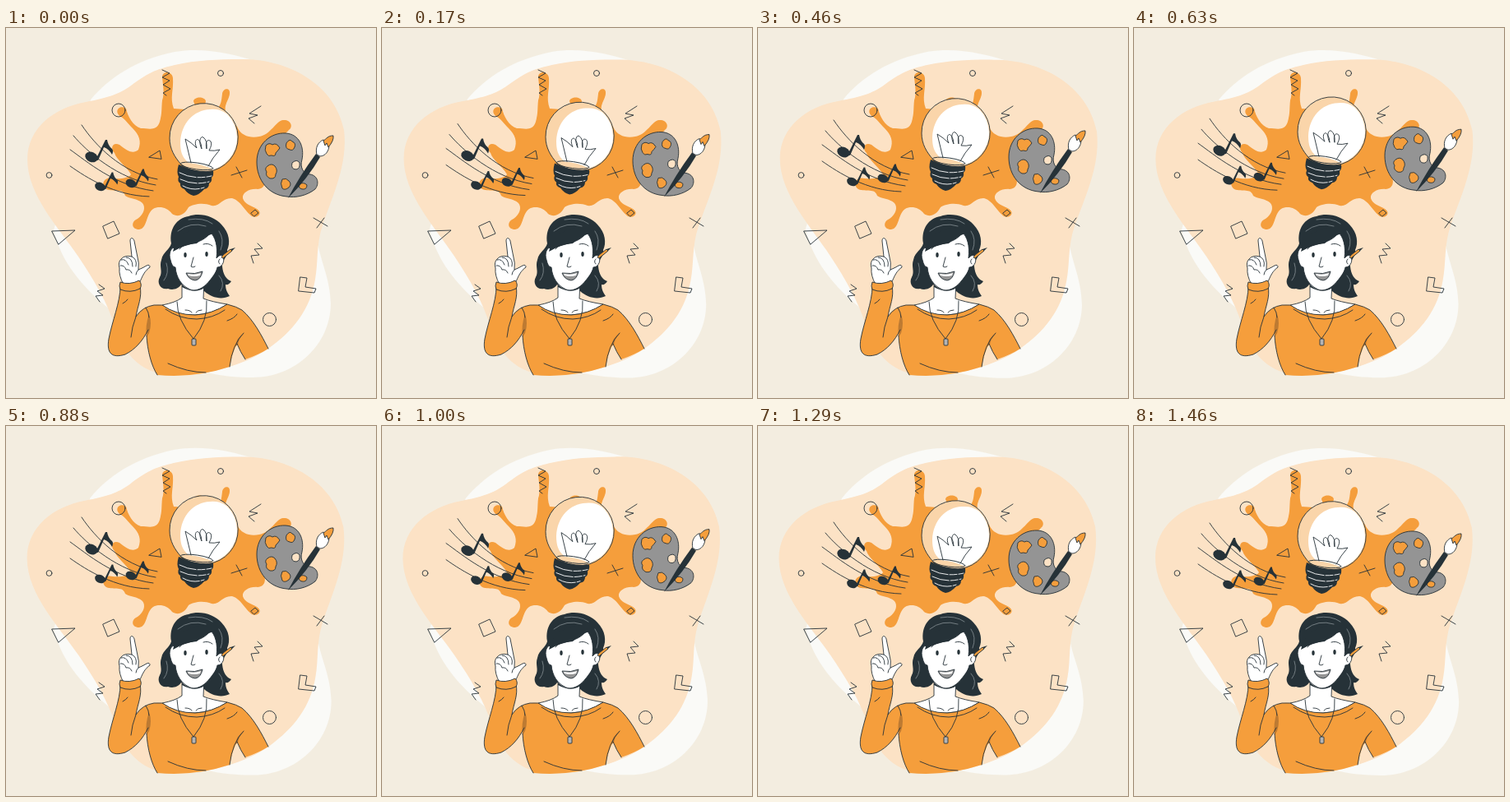
Animation, 450 px wide and 450 px high, one loop 1.5 s. Source, as an HTML page:

```html
<!DOCTYPE html>
<html lang="en">
<head>
<meta charset="utf-8">
<title>Creative idea</title>
<style>
html, body { margin: 0; width: 100%; height: 100%; overflow: hidden; background: #f3ede0; }
svg { display: block; width: 100vw; height: 100vh; }
.line { fill: none; stroke: #263238; stroke-width: .9; stroke-linecap: round; stroke-linejoin: round; }
.edge { stroke: #263238; stroke-width: .9; stroke-linejoin: round; }
.orange { fill: #f59e3c; }
.peach { fill: #fce2c5; }
.white { fill: #fff; }
.dark { fill: #263238; }
.gray { fill: #949494; }
.shade { fill: #bd7a32; }
</style>
</head>
<body>
<svg viewBox="0 0 450 450">
  <g id="backdrop">
    <path fill="#fafaf7" d="M103 87C125 61 157 39 205 29C240 23 275 31 306 41L379 262C384 287 394 305 395 335C395 385 352 425 300 425C262 425 226 418 190 398L112 330C86 306 66 280 58 246Z"/>
    <path class="peach" d="M26 160C26 122 58 97 97 90C123 85 137 81 152 70C176 52 185 50 205 45C232 39 258 38 285 38C340 37 399 66 411 124C416 165 398 202 385 240C377 264 380 285 376 306C370 342 350 368 319 390C292 409 245 423 205 423C165 421 144 398 133 364C123 333 108 308 88 278C66 245 26 204 26 160Z"/>
  </g>

  <path class="orange" d="M190 60C190 52 202 52 203 61C204 76 199 85 204 98L232 100L228 89C229 83 242 83 243 89L241 97L256 100C262 93 262 88 263 80C264 73 273 72 272 80C271 89 262 96 270 106L281 120C286 132 298 134 308 132C322 130 328 113 337 112C346 111 350 120 344 124C340 130 330 132 322 140L312 150L312 174C318 190 314 195 306 196C297 195 287 200 288 207C290 214 298 216 305 220C312 224 308 232 299 229C290 222 284 208 274 207C262 207 260 218 250 216C240 212 228 214 222 218C216 229 208 230 202 226C196 218 186 216 179 220C170 226 172 244 162 245C152 245 152 235 160 232C168 226 170 218 166 213C160 207 150 208 145 204C142 194 132 200 122 196C114 190 120 180 130 183C140 184 150 182 152 178C146 168 134 160 132 152C126 146 130 138 138 142C149 151 155 153 161 148C165 138 162 130 154 122C148 116 144 110 140 108C130 102 138 92 146 98C148 107 154 119 164 122C174 122 183 126 187 114C190 104 189 96 190 88C193 80 191 70 190 60Z"/>

  <g class="floating">
    <path class="line" d="M92 118C108 142 140 176 184 184M82 131C98 150 136 184 182 191M78 148C98 162 132 192 179 198M78 168C98 182 132 204 174 205"/>
    <g id="notes"></g>
  </g>

  <g class="floating">
    <path class="edge" fill="#fad5aa" d="M213 166C205 157 199 147 199 134A41.6 41.6 0 1 1 253 173Q232 180 213 166Z"/>
    <path class="white" d="M281 136A41 41 0 0 1 252 172Q238 165 222 164C214 157 212 150 212 139C213 116 228 100 248 99Q260 98 268 104Q281 116 281 136Z"/>
    <path class="line" d="M225 164L218 135Q225 139 232 146C228 138 232 133 235 137Q238 141 238 147C234 139 236 131 240 133Q245 137 244 147C242 139 245 134 249 138Q251 142 247 149Q253 150 260 148Q251 158 246 168"/>
    <ellipse class="line" cx="232" cy="168" rx="20" ry="4" transform="rotate(8 232 168)"/>
    <path class="dark" d="M210 166Q230 176 252 174Q253 179 250 182Q251 187 247 189Q247 195 241 196Q235 203 228 204Q221 202 217 196Q211 194 212 189Q208 186 210 181Q207 176 210 166Z"/>
    <path class="line" style="stroke:#fff" stroke-dasharray="21 2 9 2" d="M211 176Q228 185 250 180M212 184Q228 192 247 187M215 192Q227 199 241 194"/>
  </g>

  <g class="floating">
    <path class="gray edge" d="M305 163C305 141 322 127 340 128C357 129 363 145 360 160C357 170 362 178 370 178C380 180 381 190 376 196C366 204 352 207 341 205C319 203 305 185 305 163Z"/>
    <g class="orange edge">
      <path d="M316 143Q320 139 324 142Q329 139 333 146Q331 149 328 152Q328 157 323 155Q319 157 317 153Q314 149 316 143Z"/>
      <path d="M341 140Q345 134 348 138Q353 140 351 145Q349 150 345 148Q339 147 341 140Z"/>
      <path d="M318 168Q323 164 327 168Q331 173 328 178Q328 184 321 183Q315 180 317 175Q314 171 318 168Z"/>
      <path d="M336 184Q341 182 344 186Q348 190 344 194Q339 198 336 195Q333 189 336 184Z"/>
      <path d="M357 190Q362 187 366 191Q366 197 360 196Q355 195 357 190Z"/>
      <path class="peach" d="M348 164Q354 159 357 164Q358 171 353 172Q346 172 348 164Z"/>
    </g>
    <path class="dark" d="M343 207Q357 180 377 153L382 157Q367 183 343 207Z"/>
    <path class="white edge" d="M378 154C376 146 379 139 386 136L393 142C393 150 388 156 382 156Z"/>
    <path class="orange edge" d="M386 137C390 135 391 131 398 131Q399 137 392 145L390 140L388 143Z"/>
  </g>

  <g id="woman">
    <path class="dark" d="M201 262C198 244 208 231 222 229C236 224 253 229 262 239C272 249 273 262 269 270C271 278 262 282 263 290C264 300 268 306 274 308Q271 313 267 312C267 319 270 323 272 326C262 331 250 328 241 320L213 312C209 318 202 319 197 317C188 319 183 310 187 303C191 296 186 290 189 282C191 272 199 270 201 262Z"/>
    <path class="white edge" d="M214 306L214 328Q206 334 190 337Q207 352 230 349Q252 348 269 336Q250 333 240 329L241 306Z"/>
    <path class="dark" d="M214 312Q228 325 241 313L241 316Q230 324 214 315Z"/>
    <path class="white edge" d="M206 268C202 265 197 273 200 282Q202 291 206 291C207 304 214 313 222 317C230 322 241 316 247 308C253 301 256 296 257 291C264 291 267 281 263 277Q260 275 256 280C258 264 254 254 249 249C236 265 218 261 206 268Z"/>
    <path class="dark" d="M203 272Q207 251 230 244Q244 239 252 250Q240 254 232 262Q218 263 203 272Z"/>
    <path class="line" style="stroke:#7c868b" stroke-width=".6" d="M209 247Q224 235 243 241M222 233Q240 230 251 238M259 247Q266 257 261 270M195 286Q199 298 192 307M259 301Q267 310 261 320"/>
    <ellipse class="dark" cx="218" cy="276" rx="1.7" ry="3"/>
    <ellipse class="dark" cx="244" cy="275" rx="1.7" ry="3"/>
    <path class="line" d="M211 269Q214 264 219 264M240 263Q246 261 251 265M228 279L225 290Q227 292 230 290M260 281Q257 284 260 287"/>
    <path class="gray edge" d="M219 298Q230 300 239 296Q237 306 230 307Q222 306 219 298Z"/>
    <path class="white" d="M221 299Q230 301 237 298L236 301Q229 303 222 301Z"/>
    <path class="orange edge" d="M262 279L264 276L273 269L275 271L264 280Z"/>
    <path class="dark" d="M273 269L279 267L275 271Z"/>

    <path class="orange" d="M190 337Q173 335 166 346L171 374C172 393 177 411 184 422Q230 426 272 412Q275 395 281 384Q285 394 291 403Q306 398 319 390C311 374 301 355 287 343Q281 339 269 336Q250 348 230 349Q207 349 190 337Z"/>
    <path class="orange" d="M139 315C139 333 129 357 125 378C122 396 129 402 145 397C157 391 166 381 173 367L180 337Q166 339 158 351C160 338 166 327 163 314Z"/>
    <path class="shade" d="M174 348Q178 359 174 371L171 376Q169 362 174 348Z"/>
    <path class="shade" d="M289 371Q280 377 279 387L282 385Q283 378 289 371Z"/>
    <path class="line" d="M139 315C139 333 129 357 125 378C122 396 129 402 145 397C157 391 166 381 173 367M163 314C166 327 160 338 158 351Q166 339 180 337L190 337Q207 349 230 349Q250 348 269 336Q281 339 287 343C301 355 311 374 319 390M184 422C177 411 172 393 171 374M194 342Q211 354 232 354Q252 353 266 343M197 408Q221 419 243 419M269 356Q278 353 281 348M289 371Q275 385 272 412M281 384Q285 394 291 403"/>
    <path class="line" d="M158 351Q153 364 152 376M170 340Q174 346 174 352M142 335Q146 333 148 330"/>
    <path class="white edge" d="M151 259C151 254 155 255 156 259L160 279Q162 285 161 294Q166 292 171 289Q175 287 175 291C169 295 166 301 162 311L143 312Q137 301 138 292Q136 285 140 281Q144 276 153 278Z"/>
    <path class="line" d="M140 282Q146 280 149 288M146 279Q154 279 154 290M153 278Q160 281 158 290M139 289Q144 288 146 294Q151 293 153 298M161 294Q158 297 158 300"/>
    <path class="orange edge" d="M139 309Q150 313 162 307Q166 312 163 317Q151 323 139 318Q137 314 139 309Z"/>
    <path class="line" d="M208 333Q208 355 228 378Q246 356 244 332M218 343Q224 343 226 346M238 343Q233 343 231 346"/>
    <rect class="edge" fill="#b4b4b4" x="226" y="378" width="5" height="8" rx="1"/>
  </g>

  <g class="line">
    <circle cx="137" cy="100" r="8"/>
    <circle cx="261" cy="55" r="3.5"/>
    <circle cx="52.5" cy="179" r="3.4"/>
    <circle cx="320.5" cy="354.5" r="8"/>
    <path d="M190 51L199 55L190 60L199 64L191 69L200 74L191 79L195 82"/>
    <path d="M310 95L296 104L306 106L295 110L302 116"/>
    <path d="M174 157L187 149L189 159ZM56 247L84 246L64 263Z"/>
    <path d="M274 179L293 173M280 169L287 182M374 231L391 241M387 231L378 243"/>
    <path d="M298 225L303 221L307 225L302 229ZM118 241L131 235L138 250L124 256Z"/>
    <path d="M306 262L312 268L302 269L308 276L298 277L301 286"/>
    <path d="M358 303L366 304L364 315L377 317L375 322L356 320Z"/>
    <path d="M113 312L120 317L111 320L118 325L109 326L114 333"/>
  </g>
</svg>
<script>
const LOOP = 1500;
const backdrop = document.getElementById("backdrop");
const floating = document.querySelectorAll(".floating");

const note = (x, y, size) => `
  <g transform="translate(${x} ${y}) scale(${size})">
    <ellipse class="dark" rx="8" ry="6" transform="rotate(25)"/>
    <path class="dark" d="M5 3L17 -21L19 -21Q20 -14 25 -10Q27 -8 25 -3Q21 -10 15 -12L8 4Z"/>
  </g>`;
document.getElementById("notes").innerHTML =
  note(104, 157, 1) + note(114.5, 193, .83) + note(152, 189, .83);

function draw(now) {
  const angle = now % LOOP / LOOP * 2 * Math.PI;
  const lift = 4 * (Math.cos(angle + .17) - 1);
  backdrop.setAttribute("transform", `rotate(${.6 * Math.sin(angle + .05)} 220 230)`);
  for (const part of floating) part.setAttribute("transform", `translate(0 ${lift})`);
  requestAnimationFrame(draw);
}
draw(performance.now());
</script>
</body>
</html>
```
